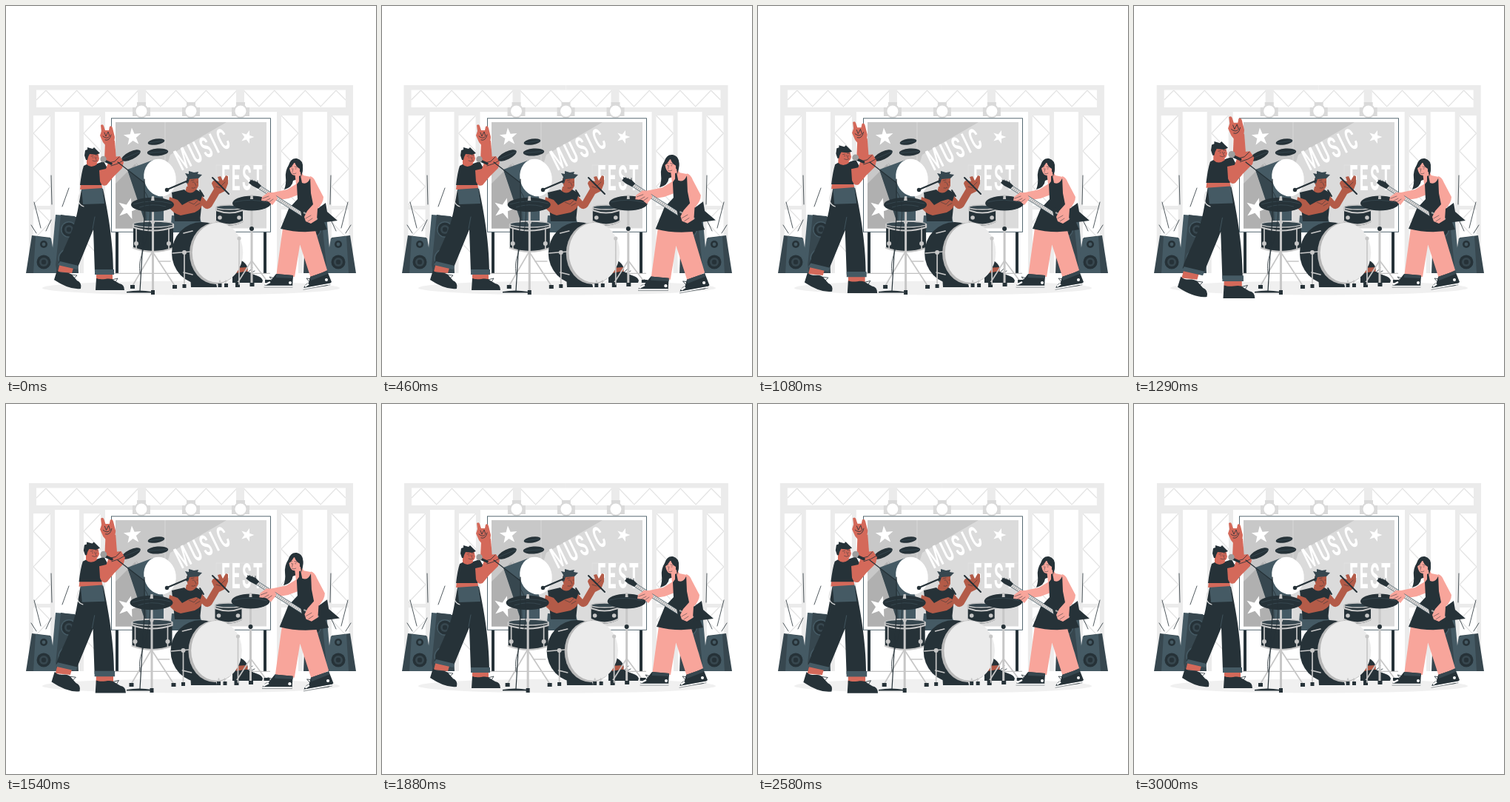
Animation of 500x500 px, one loop 3040 ms. Source, as an HTML page:

```html
<!DOCTYPE html>
<html lang="en">
<head>
<meta charset="utf-8">
<title>Rock band on stage</title>
<style>
html, body { margin: 0; width: 100%; height: 100%; overflow: hidden; background: #fff; }
svg { display: block; width: 100vw; height: 100vh; }
.ink { fill: #263238; }
.slate { fill: #455a64; }
.steel { fill: #37474f; }
.tan { fill: #d4695a; }
.brown { fill: #b35b48; }
.pink { fill: #f8a59b; }
.metal { fill: #c7c7c7; }
.line, .fine, .stick { fill: none; stroke: #263238; stroke-width: .8; stroke-linecap: round; stroke-linejoin: round; }
.fine { stroke-width: .5; }
.stick { stroke-width: 2; }
.glint { fill: none; stroke: #455a64; stroke-width: .5; }
.pole, .leg, .rim { fill: none; stroke: #c7c7c7; stroke-width: 3; stroke-linecap: round; }
.leg { stroke-width: 1.7; }
.rim { stroke-width: 2.2; }
.poster { font-family: Roboto, "Liberation Sans", sans-serif; font-weight: 600; fill: #fff; }
</style>
</head>
<body>
<svg viewBox="0 0 500 500" xmlns="http://www.w3.org/2000/svg">
  <defs>
    <path id="star" fill="#fff" d="M0-1 .24-.32 .95-.31 .38 .12 .59 .81 0 .4-.59 .81-.38 .12-.95-.31-.24-.32Z"/>
    <g id="lamp">
      <path fill="#d9d9d9" d="M-6-12H6V-7H-6ZM-12-5H12V7H-12Z"/>
      <circle r="9.500" fill="#d9d9d9"/><circle r="7.500" fill="#fff"/>
    </g>
    <g id="cone">
      <circle r="11" fill="#455a64"/><circle r="9.500" fill="#263238"/>
      <circle r="6" fill="#37474f"/><circle r="3.200" fill="#263238"/>
    </g>
    <g id="side">
      <path class="slate" d="M67 282 93 284 97 361H60Z"/>
      <path class="steel" d="M74 282 95 285 98 361H66Z"/>
      <use href="#cone" transform="translate(85 302)"/>
      <use href="#cone" transform="translate(83 341) scale(1.150)"/>
      <path class="steel" d="M35 310 60 313 65 361H27Z"/>
      <path class="slate" d="M40 311 61 314 69 361H37Z"/>
      <circle class="ink" cx="51" cy="322" r="5"/><circle class="slate" cx="51" cy="322" r="2.400"/>
      <use href="#cone" transform="translate(51 346)"/>
      <path class="line" d="M61 229 62 268M76 271 85 246M38 265 47 300M34 296 41 307M54 304 61 289"/>
    </g>
  </defs>
  <rect width="500" height="500" fill="#fff"/>

  <g id="truss">
    <g id="half"></g>
    <use href="#half" transform="matrix(-1 0 0 1 498 0)"/>
    <use href="#lamp" x="182" y="142"/><use href="#lamp" x="249" y="142"/><use href="#lamp" x="316" y="142"/>
  </g>

  <ellipse cx="250" cy="381" rx="201" ry="9.500" fill="#f0f0f0"/>

  <g id="board">
    <path d="M150 303V361M350 303V361" stroke="#263238" stroke-width="4"/>
    <path d="M131 361.300H357" stroke="#9e9e9e" stroke-width=".8"/>
    <rect x="142.500" y="151.800" width="215" height="153.500" fill="#fff" stroke="#455a64" stroke-width=".9"/>
    <rect x="148" y="157" width="204" height="143.500" fill="#dbdbdb"/>
    <path fill="#c8c8c8" d="M148 157H298L222 201 190 300.500H148Z"/>
    <path fill="#b0b0b0" d="M148 240 176 212 200 240 190 300.500H148Z"/>
    <path d="M215 157V300M284 215V300M284 215H352" stroke="#e4e4e4" stroke-width=".6"/>
    <use href="#star" transform="translate(171 177) rotate(-5) scale(12.500)"/>
    <use href="#star" transform="translate(326 177) rotate(18) scale(9.500)"/>
    <use href="#star" transform="translate(165 274) rotate(15) scale(15)"/>
    <g class="poster">
      <text transform="translate(237 223) rotate(-26) scale(.5 1)" font-size="40" letter-spacing="7">MUSIC</text>
      <text transform="translate(291 249) scale(.42 1)" font-size="49" letter-spacing="6">FEST</text>
    </g>
  </g>

  <use href="#side"/>
  <use href="#side" transform="matrix(-1 0 0 1 500 0)"/>

  <g id="back-kit">
    <path class="leg" d="M170 203 181 224M205 184 207 210"/>
    <path class="slate" d="M164 221 199 208 213 262V290H189Z"/>
    <path class="steel" d="M164 221 187 238 190 290H187Z"/>
    <ellipse cx="208" cy="232" rx="21.500" ry="25.500" fill="#fff" transform="rotate(-15 208 232)"/>
    <ellipse class="ink" cx="169" cy="202" rx="14" ry="5.300" transform="rotate(-26 169 202)"/>
    <ellipse class="ink" cx="203" cy="183.500" rx="11.500" ry="4" transform="rotate(-9 203 183.500)"/>
    <ellipse class="ink" cx="205" cy="197.500" rx="14.200" ry="5" transform="rotate(-4 205 197.500)"/>
    <path class="glint" d="M157 207 181 197M193 185 214 182M192 198.500 218 196.500"/>
  </g>

  <g id="drummer">
    <path class="slate" d="M224 283 262 286 268 306H222Z"/>
    <path class="ink" d="M300 338C318 340 329 350 326 358L309 362 290 356Z"/>
    <path class="brown" d="M309 354 326 353 327 361 312 365Z"/>
    <path class="ink" d="M306 359C313 364 322 356 329 360 336 365 345 364 347 371L346 374H306Z"/>
    <path class="line" d="M328 359 333 354M330 361 336 358"/>
    <path class="ink" d="M249 364C260 368 267 366 274 371 281 374 285 374 285 380H250Z"/>
    <path class="brown" d="M244 244 257 243 258 254 241 256Z"/>
    <path class="ink" d="M224 252 241 248Q249 257 257 248L266 253 262 291H228Z"/>
    <path class="brown" d="M244 233Q251 228 260 232L260 243Q257 251 250 249 244 246 244 233Z"/>
    <path class="steel" d="M243 239 245 231 242 226 247 227 247 223 254 225 260 224 259 227 265 228 260 233 248 234 246 240Z"/>
    <path class="fine" d="M252 238H254M258 238H259M255 239 257 243M251 246Q254 247 256 245M250 236 254 235"/>
    <path class="stick" d="M219 247.500 246 236"/>
    <circle class="ink" cx="217.500" cy="248.500" r="2.700"/>
    <path class="brown" d="M221 258 232 262 238 269 247 264 257 261 265 265Q267 273 255 279L236 283Q226 281 219 270Z"/>
    <path class="fine" d="M247 265 254 268 259 263M256 270 263 266"/>
    <path class="stick" d="M262 249 267 257"/>
    <path class="brown" d="M265 257 271 264 281 247 278 240Q279 235 284 236L288 237 286 231 290 230 293 236 297 229 300 230 300 240 296 250 288 254 278 271Q273 277 267 272L262 266Z"/>
    <path class="stick" d="M279 232 301 254"/>
    <path class="fine" d="M285 238 291 243 296 238M284 244 290 246"/>
  </g>

  <g id="kit">
    <path class="leg" d="M332 344 313 374M332 344 353 372M302 296 289 315V378"/>
    <path class="pole" d="M332 274V376"/>
    <path class="ink" d="M329.500 374H335.500V379H329.500ZM310 373H316V380H310ZM350 370H358V374H350Z"/>

    <path class="ink" d="M172 295V327Q199 337 226 327V295Z"/>
    <path class="rim" d="M172 295V299Q199 308 226 299V295M172 327Q199 337 226 327"/>
    <ellipse cx="199" cy="295" rx="27" ry="4" fill="#37474f" stroke="#c7c7c7" stroke-width="1.400"/>
    <path class="leg" d="M176 300V328M220 300V328M198 332 171 378M198 332 228 378M206 345 222 345"/>
    <circle class="metal" cx="176" cy="321" r="3"/><circle class="metal" cx="220" cy="321" r="3"/>
    <path class="pole" d="M198.500 276V386"/>
    <path class="ink" d="M196 384H201V390H196ZM168 377H174V382H168ZM225 377H231V382H225Z"/>
    <circle class="metal" cx="198.500" cy="292" r="2.600"/>
    <ellipse class="ink" cx="198" cy="268.500" rx="29" ry="9.700"/>
    <path class="glint" d="M172 268Q198 260 224 267M180 272Q198 266 216 271"/>
    <path class="metal" d="M197 257H200L200.500 263H196Z"/>

    <path class="ink" d="M284 273V292Q302 301 320 292V273Z"/>
    <path class="rim" d="M284 273V276Q302 283 320 276V273M284 291Q302 300 320 291"/>
    <ellipse cx="302" cy="272" rx="18" ry="3" fill="#37474f" stroke="#c7c7c7" stroke-width="1.300"/>
    <circle class="metal" cx="289" cy="286" r="2.800"/><circle class="metal" cx="315" cy="286" r="2.800"/>

    <ellipse class="ink" cx="264.500" cy="334" rx="40.500" ry="42"/>
    <ellipse cx="283.500" cy="334.300" rx="35.500" ry="41.700" fill="#b8b8b8"/>
    <ellipse cx="286" cy="333.300" rx="34.300" ry="40.500" fill="#ebebeb"/>
    <path class="leg" d="M225 334 249 332M241 334V377M240 307 252 304M240 360 252 363M289 371V376M297 371V376M315 314V376"/>
    <circle class="metal" cx="241" cy="333" r="3"/>
    <path class="ink" d="M238.500 376H243.500V381H238.500ZM286.500 375H291.500V380H286.500ZM295 375H300V380H295Z"/>
    <circle class="metal" cx="315" cy="314" r="2.600"/>

    <ellipse class="ink" cx="332" cy="266.500" rx="26" ry="10"/>
    <path class="glint" d="M309 265Q332 259 354 266"/>
    <path class="metal" d="M330.500 255H333.500L334 261H330Z"/>
    <circle class="ink" cx="332" cy="301" r="3"/>
  </g>

  <g id="singer">
    <path class="tan" d="M134 184 147 182 149 208 140 215 133 208Z"/>
    <path class="tan" d="M131 184 127 175 129 169 128 161Q131 159 132 162L134 168 139 168 140 163Q143 161 144 165L147 177 146 186 136 190Z"/>
    <path class="line" d="M133 171 135 176 138 170 140 176M131 176Q136 180 139 177M134 181Q140 183 142 174"/>
    <path class="tan" d="M73 347 92 351 89 361 70 359ZM122 358H144V371H122Z"/>
    <path class="ink" d="M69 357C75 364 82 358 89 363L96 371Q103 374 101 382Q86 384 65 370Z"/>
    <path class="ink" d="M122 368C130 371 137 367 143 369L153 375Q160 376 160 384H121Z"/>
    <path class="line" d="M88 363 96 364 92 368M143 370 151 368 148 373"/>
    <path class="ink" d="M102 248 131 247C136 270 145 315 145 360H120L118 302 97 353 71 347C82 316 92 306 98 270Z"/>
    <path class="slate" d="M73 345 98 351 96 356 70 350ZM120 356H146V363H120Z"/>
    <path class="slate" d="M102 246 130 245 133 267 104 268Z"/>
    <path class="line" d="M117 301 120 285" style="stroke:#455a64"/>
    <path class="line" d="M100 253Q94 267 105 271" style="stroke:#ddd;stroke-width:1.200"/>
    <path class="tan" d="M101 240 129 239 130 246 100 248Z"/>
    <path class="ink" d="M105 216Q112 211 120 214L132 210 138 221 129 242H100Q102 225 105 216Z"/>
    <path class="tan" d="M109 207 122 206 123 214Q115 220 109 214Z"/>
    <path class="tan" d="M108 198Q116 194 124 198L126 206Q125 213 118 213 108 211 108 198Z"/>
    <path class="ink" d="M108 208 106 202 107 195 110 194 110 191 117 193 119 191 123 195 127 199 122 201 113 200 111 204 110 208Z"/>
    <path class="fine" d="M115 203 118 202.500M121 202 124 202M117 205H118M122 205H123M120 204 122 208M117 209Q120 211 123 209"/>
    <path class="tan" d="M126 222 135 220 138 212 145 204 154 203 159 211 157 219 145 231 136 242Q130 245 127 237Z"/>
    <path class="line" d="M139 212 147 210 153 204M142 216 151 213 158 209"/>
    <path class="stick" d="M133 209 142 213" style="stroke-width:3.500"/>
    <circle cx="131.500" cy="207" r="4.200" fill="#9e9e9e"/>
  </g>

  <g id="stand">
    <path class="line" d="M151 211 187 239M187 234 187 285 181 385" style="stroke-width:1.200"/>
    <path class="line" d="M187 250C203 270 190 315 185 331S180 350 181 362"/>
    <path class="ink" d="M163 386Q180 383 197 386V387.500H163Z"/>
  </g>

  <g id="guitarist">
    <path class="ink" d="M382 215Q385 205 393 206 402 208 401 220L399 232 388 236Q387 245 376 248 379 240 378 232 377 223 382 215Z"/>
    <path class="pink" d="M393 240 380 248 361 252 364 263 382 260 398 254Z"/>
    <path class="pink" d="M374 300 401 300 390 366H365ZM390 300 417 300 434 357 412 368Z"/>
    <path class="ink" d="M365 362 388 364 387 379H349Q350 373 357 372ZM411 366 434 358 440 373 434 378 402 382Q403 376 409 374Z"/>
    <path d="M349 378.800H387M402 382 438 375.500" fill="none" stroke="#fff" stroke-width="2"/>
    <path class="fine" d="M349 380H387M402 383.200 438 376.700M350 377H387M404 380 438 374"/>
    <path d="M350 376.500 357 373M404 379 409 375.500" fill="none" stroke="#fff" stroke-width="2.500"/>
    <circle cx="384" cy="374" r="2" fill="#fff"/><circle cx="433" cy="370" r="2" fill="#fff"/>
    <path class="line" d="M361 372 356 366 363 368M411 374 406 368 413 369"/>
    <path class="steel" d="M365 362 388 364V368L365 367ZM411 366 434 358 435 362 412 371Z"/>
    <path class="pink" d="M390 224 399 224 402 229 412 231 414 244 393 249Z"/>
    <path class="ink" d="M393 241 396 237 396 230 398 229 400 239Q407 242 411 233L413 234 414 248 418 265 434 302Q402 309 371 301L382 274 394 261Z"/>
    <path class="pink" d="M383 216Q390 208 397 216L397 225Q393 231 387 228 383 224 383 216Z"/>
    <path class="ink" d="M382 220Q383 206 393 207 402 209 401 222L399 231 397 220Q391 217 390 210 388 216 382 220Z"/>
    <path class="fine" d="M384 218 387 217M390 217 393 218M386 220H387M391 220H392M388 220 387 224M387 226Q389 228 392 226"/>
    <path d="M338 242 404 284" stroke="#455a64" stroke-width="5.200"/>
    <path d="M338 242 404 284" stroke="#d8d8d8" stroke-width="4"/>
    <path d="M338 242 404 284" stroke="#757575" stroke-width="3.600" stroke-dasharray=".4 2.200"/>
    <path class="ink" d="M328 239 331 235 340 238 345 243 341 247 333 243Z"/>
    <path class="line" d="M331 238 330 235M334 238 333 235M337 239 336 236M340 240 340 236"/>
    <path class="ink" d="M398 276 407 270 417 277 432 266 434 278 448 290 424 293 408 295 400 287Z"/>
    <path d="M402 279 421 288" stroke="#9e9e9e" stroke-width="2"/>
    <path class="pink" d="M346 258 354 252 363 252 367 260 360 269 354 264 345 263Z"/>
    <path class="fine" d="M347 260 355 257M350 264 357 260M354 266 361 261"/>
    <path class="pink" d="M411 230Q416 231 419 239L429 258Q429 266 421 274L420 289 412 294 405 291 403 285 407 277 415 268 412 253Z"/>
    <path class="fine" d="M405 287 412 283M408 291 414 287"/>
  </g>
</svg>
<script>
const LOOP = 3040;
const el = id => document.getElementById(id);

// Each table holds [time, value] stops joined by cosine easing.
const singerBeat = [[0, 0], [960, 0], [1080, .35], [1310, 1], [1540, .57], [1760, 0], [2170, 0], [2210, .06], [2410, 1], [2580, .6], [2770, 0], [LOOP, 0]];
const guitarBeat = [[0, 0], [230, 0], [460, 1], [690, 0], [1310, 0], [1540, 1], [1770, 0], [LOOP, 0]];
const kitShift = [[0, 0], [460, .8], [1080, 1.1], [1540, -1.5], [2210, -1.2], [2580, -.3], [LOOP, 0]];

function sample(stops, t) {
  const i = stops.findIndex(s => s[0] > t);
  const [t0, a] = stops[i - 1], [t1, b] = stops[i];
  return a + (b - a) * (1 - Math.cos(Math.PI * (t - t0) / (t1 - t0))) / 2;
}

// Left half of the truss; the right half mirrors it about x = 249.
function buildTruss() {
  const rect = (x, y, w, h) => `M${x} ${y}h${w}v${h}h${-w}Z`;
  const zigzag = (x, y, n, dx, dy) => {
    let d = `M${x} ${y}`;
    for (let k = 1; k <= n; k++) d += `l${dx(k)} ${dy(k)}`;
    return d;
  };
  const flip = (k, size) => k % 2 ? size : -size;
  let solid = rect(30, 107, 219, 6.5) + rect(30, 137, 219, 6) + rect(30, 113, 10, 25) + rect(177, 113, 11, 25);
  let lattice = zigzag(53, 114, 6, () => 20.8, k => flip(k, 22)) + "M40 127L53 114"
    + zigzag(187, 114, 3, () => 20.8, k => flip(k, 22));
  for (const x of [30, 98]) {
    solid += rect(x, 143, 6, 218) + rect(x + 29, 143, 6, 218) + rect(x, 143, 35, 5) + rect(x, 270, 35, 5);
    lattice += zigzag(x + 29, 148, 8, k => flip(k, -23), () => 24);
  }
  el("half").innerHTML =
    `<path d="${lattice}" fill="none" stroke="#e3e3e3" stroke-width="1.2"/><path d="${solid}" fill="#ebebeb"/>`;
}

const move = (id, x) => el(id).setAttribute("transform", `translate(${x} 0)`);
const grow = (id, x, y, s) =>
  el(id).setAttribute("transform", `translate(${x} ${y}) scale(${s}) translate(${-x} ${-y})`);

function draw() {
  const t = performance.now() % LOOP;
  move("truss", Math.cos(2 * Math.PI * (t + 40) / (LOOP / 2)));
  move("kit", sample(kitShift, t));
  grow("singer", 126, 272, 1 + .1 * sample(singerBeat, t));
  grow("guitarist", 395, 297, 1 + .055 * sample(guitarBeat, t));
  requestAnimationFrame(draw);
}

buildTruss();
draw();
</script>
</body>
</html>
```
